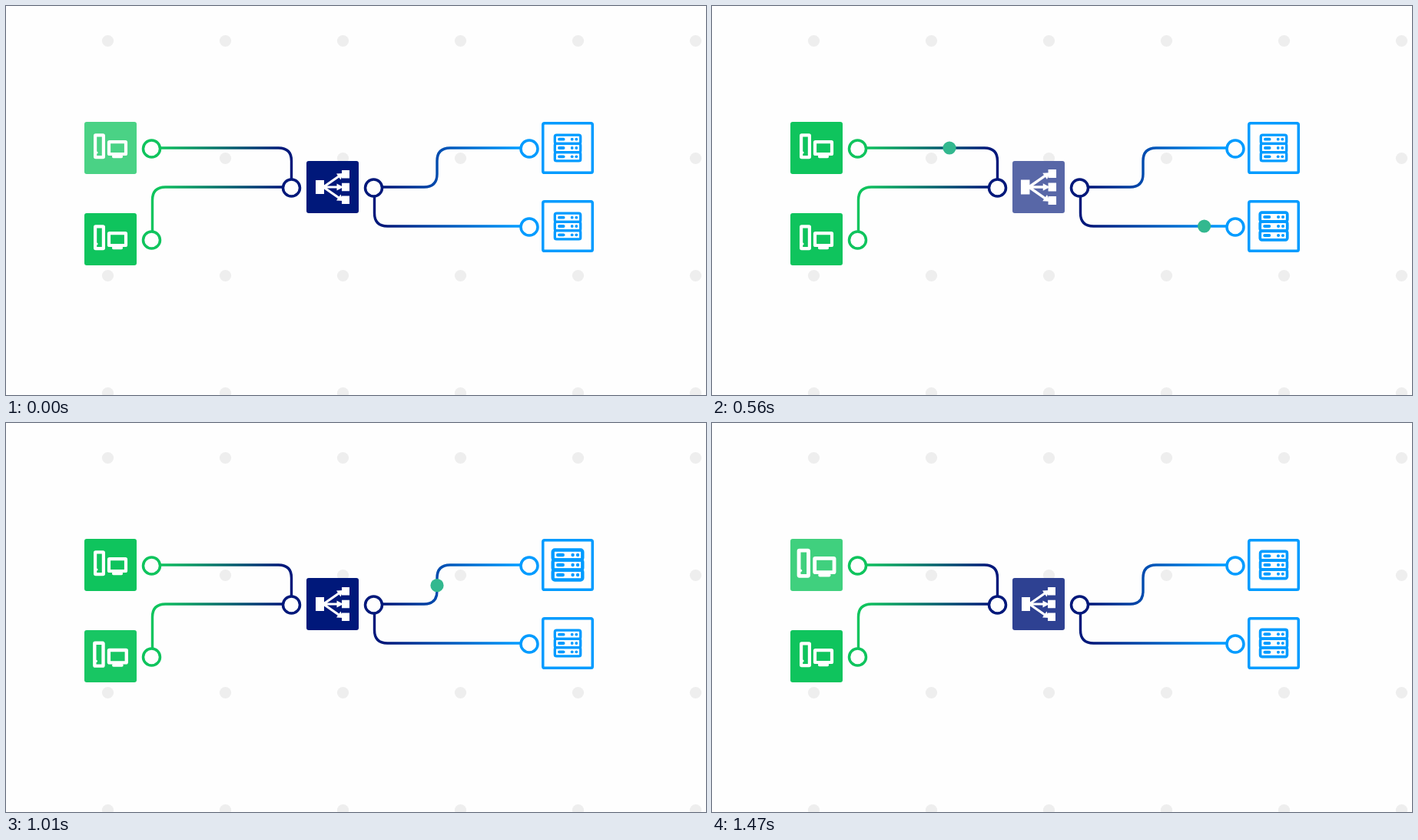
These frames come from a looping animation (911 by 507 pixels, 1.57 s). An HTML page:

```html
<!DOCTYPE html>
<html lang="en">
<head>
<meta charset="utf-8">
<title>Load balancer</title>
<style>
html, body { margin: 0; height: 100%; overflow: hidden; background: #fefefe; }
svg { display: block; width: 100%; height: 100%; }
</style>
</head>
<body>
<svg viewBox="0 0 911 507">
  <defs>
    <linearGradient id="inflow" gradientUnits="userSpaceOnUse" x1="200" x2="360">
      <stop stop-color="#0fc45d"/><stop offset="1" stop-color="#00187a"/>
    </linearGradient>
    <linearGradient id="outflow" gradientUnits="userSpaceOnUse" x1="495" x2="665">
      <stop stop-color="#00187a"/><stop offset="1" stop-color="#009bff"/>
    </linearGradient>
    <pattern id="dots" patternUnits="userSpaceOnUse" x="56" y="-31" width="153" height="153">
      <circle cx="76.5" cy="76.5" r="7.6" fill="#eee"/>
    </pattern>
    <!-- Icons are centred on the origin -->
    <g id="client">
      <g fill="none" stroke="#fff" stroke-width="4.2">
        <rect x="-19.9" y="-14.4" width="10.8" height="28.8" rx=".6"/>
        <rect x="-2" y="-5.5" width="22" height="15.8" rx=".6"/>
      </g>
      <circle cx="-18" cy="8.3" r="1.6" fill="#fff"/>
      <rect x="2" y="11.5" width="14" height="4" rx="1.7" fill="#fff"/>
    </g>
    <g id="balancer" fill="#fff">
      <path d="M-22-9h11V9h-11zM12-22h10v10.5H12zM12-5.2h10V5.3H12zM12 11.5h10V22H12z"/>
      <path d="M-12 0L11-16M-12 0H11M-12 0L11 16" stroke="#fff" stroke-width="3.2"/>
      <path d="M5-17.5L14-18L10.5-9.5zM5.5-4.5L14 0L5.5 4.5zM5 17.5L14 18L10.5 9.5z"/>
    </g>
    <g id="unit" fill="#009bff">
      <rect x="-16.7" y="-5.6" width="33.4" height="11.2" rx="2.2" fill="none" stroke="#009bff"/>
      <rect x="-13" y="-1.9" width="9.5" height="3.8" rx="1.9"/>
      <circle cx="5.7" r="1.9"/>
      <circle cx="11.3" r="1.9"/>
    </g>
    <g id="server">
      <use href="#unit" y="-11.3"/><use href="#unit"/><use href="#unit" y="11.3"/>
    </g>
  </defs>
  <rect width="911" height="507" fill="#fefefe"/>
  <rect x="56" width="855" height="507" fill="url(#dots)"/>
  <g id="stage"></g>
</svg>
<script>
const LOOP = 1570, LAST_STEP = 1470;
const TRAVEL = 278;
const FADE = 480, GROW = 310, SERVER_GROW = 400;
const GREEN = '#0fc45d', NAVY = '#00187a', BLUE = '#009bff', PAPER = '#fefefe';
const stage = document.getElementById('stage');

function add(tag, attrs) {
  const el = document.createElementNS('http://www.w3.org/2000/svg', tag);
  for (const key in attrs) el.setAttribute(key, attrs[key]);
  return stage.appendChild(el);
}

const route = (d, flow) =>
  add('path', { d, fill: 'none', stroke: `url(#${flow})`, 'stroke-width': 3.4 });

const topIn = route('M189.5 185H354.5q17 0 17 17V237', 'inflow');
const lowIn = route('M190.5 305V253q0-17 17-17H371.5', 'inflow');
const topOut = route('M478.5 236H544q17 0 17-17V202q0-17 17-17H681', 'outflow');
const lowOut = route('M479.5 237V270q0 17 17 17H681', 'outflow');

const packet = (path, start, duration = TRAVEL) => ({
  path, start, duration, length: path.getTotalLength(),
  dot: add('circle', { r: 8.6, fill: '#33b88f' })
});
const packets = [
  packet(lowIn, 50), packet(topIn, 415), packet(topIn, 1155),
  packet(topOut, 641), packet(topOut, 895),
  packet(lowOut, 262, 358), packet(lowOut, 718)
];

function ring(cx, cy, stroke) {
  add('circle', { cx, cy, r: 11, stroke, fill: PAPER, 'stroke-width': 3.5 });
}
ring(189.5, 186, GREEN);
ring(189.5, 305, GREEN);
ring(371.5, 237, NAVY);
ring(478.5, 237, NAVY);
ring(681, 186, BLUE);
ring(681, 288, BLUE);

// Each node pulses at the given start times
function node(icon, x, y, color, pulses) {
  const outlined = icon === 'server', inset = outlined ? 1.75 : 0, size = 68 - 2 * inset;
  add('rect', { x, y, width: 68, height: 68, rx: 3, fill: PAPER });
  const tile = add('rect', {
    x: x + inset, y: y + inset, width: size, height: size, rx: 3 - inset / 2,
    fill: outlined ? PAPER : color, stroke: outlined ? color : 'none', 'stroke-width': 3.5
  });
  const mark = add('use', { href: '#' + icon });
  return { tile, mark, pulses, outlined, cx: x + 34, cy: y + (icon === 'client' ? 31.7 : 34) };
}

const nodes = [
  node('client', 102, 151, GREEN, [-326, 1336]),
  node('client', 102, 270, GREEN, [960]),
  node('balancer', 391, 202, NAVY, [308, 1112]),
  node('server', 697, 151, BLUE, [830, 1400]),
  node('server', 697, 253, BLUE, [475, 1400])
];

// Smooth swell from 0 to 1 and back after each start time
function swell(starts, duration, t) {
  const start = starts.find(s => t > s && t < s + duration);
  return start === undefined ? 0 : Math.sin(Math.PI * (t - start) / duration) ** 2;
}

function draw(t) {
  for (const { path, start, duration, length, dot } of packets) {
    const p = (t - start) / duration;
    const { x, y } = path.getPointAtLength(p * length);
    dot.setAttribute('visibility', p > 0 && p < 1 ? 'visible' : 'hidden');
    dot.setAttribute('cx', x);
    dot.setAttribute('cy', y);
  }
  for (const { tile, mark, pulses, outlined, cx, cy } of nodes) {
    const grow = swell(pulses, outlined ? SERVER_GROW : GROW, t);
    mark.setAttribute('transform', `translate(${cx} ${cy}) scale(${1 + .16 * grow})`);
    if (outlined) mark.setAttribute('stroke-width', 3.3 + .5 * grow);
    else tile.setAttribute('opacity', 1 - .35 * swell(pulses, FADE, t));
  }
}

const begin = performance.now();
function tick() {
  draw(Math.min((performance.now() - begin) % LOOP, LAST_STEP));
  requestAnimationFrame(tick);
}
tick();
</script>
</body>
</html>
```
